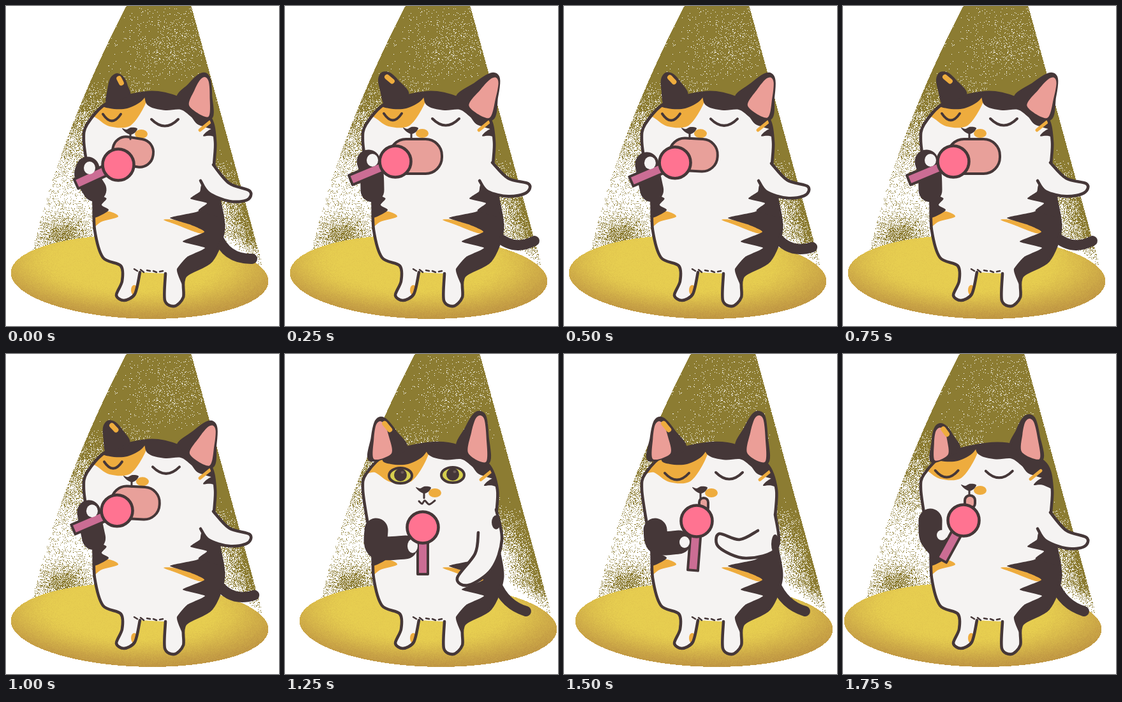
These frames come from a looping animation (428x500 px, 2000 ms). An HTML page with a canvas:

```html
<!DOCTYPE html>
<html lang="en">
<head>
<meta charset="utf-8">
<title>Singing cat</title>
<style>
html, body { margin: 0; width: 100%; height: 100%; overflow: hidden; background: #fff; }
canvas { display: block; width: 428px; height: 500px; }
</style>
</head>
<body>
<canvas id="stage" width="428" height="500"></canvas>
<script>
const ctx = document.getElementById('stage').getContext('2d');
const INK = '#453738', FUR = '#f5f3f2', ORANGE = '#eeac3e', EAR = '#eb9e97';
const MOUTH = '#e8a09a', BALL = '#ff7391', GRIP = '#cb6d94', EYE = '#d6cf4e';

const clamp = v => Math.max(0, Math.min(1, v));
const lerp = (a, b, t) => a + (b - a) * t;
const between = (a, b, t) => [lerp(a[0], b[0], t), lerp(a[1], b[1], t)];
const step = (a, b, v) => { v = clamp((v - a) / (b - a)); return v * v * (3 - 2 * v); };
const shift = (p, dx, dy) => p.map((v, i) => v + (i % 2 ? dy : dx));

// Blend two poses, number by number
function mix(a, b, t) {
  if (typeof a === 'number') return lerp(a, b, t);
  if (Array.isArray(a)) return a.map((v, i) => mix(v, b[i], t));
  return Object.fromEntries(Object.keys(a).map(k => [k, mix(a[k], b[k], t)]));
}

// Smooth path through a flat list of points
function curve(p, open, k = 0.9) {
  const n = p.length / 2, path = new Path2D();
  const at = i => {
    i = open ? Math.max(0, Math.min(n - 1, i)) : (i + n) % n;
    return [p[2 * i], p[2 * i + 1]];
  };
  path.moveTo(p[0], p[1]);
  for (let i = 0; i < (open ? n - 1 : n); i++) {
    const a = at(i - 1), b = at(i), c = at(i + 1), d = at(i + 2), t = k / 6;
    path.bezierCurveTo(b[0] + (c[0] - a[0]) * t, b[1] + (c[1] - a[1]) * t,
      c[0] - (d[0] - b[0]) * t, c[1] - (d[1] - b[1]) * t, c[0], c[1]);
  }
  if (!open) path.closePath();
  return path;
}

function ink(path, w = 4.6, color = INK) {
  ctx.strokeStyle = color;
  ctx.lineWidth = w;
  ctx.stroke(path);
}
function fill(path, color) {
  ctx.fillStyle = color;
  ctx.fill(path);
}
const blob = (color, p, k) => fill(curve(p, false, k), color);
const line = (p, w, color) => ink(curve(p, true), w, color);
function oval(color, x, y, rx, ry, w) {
  const path = new Path2D();
  path.ellipse(x, y, rx, ry, 0, 0, 7);
  fill(path, color);
  if (w) ink(path, w);
}
function box(color, x, y, angle, left, top, w, h, r) {
  const path = new Path2D();
  path.roundRect(left, top, w, h, r);
  ctx.save();
  ctx.translate(x, y);
  ctx.rotate(angle);
  fill(path, color);
  ink(path, 4);
  ctx.restore();
}

// Spotlight and floor, painted once with seeded grain
const PAD = 20;
function density(x, y, u) {
  const glow = (cx, cy, sx, sy) => Math.exp(-(((x - cx) / sx) ** 2) - ((y - cy) / sy) ** 2);
  let d = 1 - 0.09 * glow(258, 60, 60, 45);
  if (u < 0.5) d += 0.65 * glow(92, 360, 32, 24) - 0.9 * step(95, 290, y);
  else d -= step(220, 330, y) * clamp((1 - u) * 6) + 0.8 * step(350, 405, y);
  return d;
}
function makeLight() {
  const w = 470, h = 500, cv = document.createElement('canvas');
  cv.width = w;
  cv.height = h;
  const g = cv.getContext('2d'), img = g.createImageData(w, h);
  let seed = 7;
  const rnd = () => {
    seed = (Math.imul(seed, 1664525) + 1013904223) >>> 0;
    return seed / 4294967296;
  };
  const cs = Math.cos(0.036), sn = Math.sin(0.036);
  for (let y = 0; y < h; y++) for (let px = 0; px < w; px++) {
    const x = px - PAD, r = rnd(), dx = x - 209, dy = y - 423;
    const ex = (dx * cs + dy * sn) / 202, ey = (dy * cs - dx * sn) / 65;
    let c = null;
    if (ex * ex + ey * ey < 1) {
      const e = Math.hypot(ex * 0.85 + 0.05, (ey + 0.35) * 0.78);
      const m = clamp(step(0.45, 1.15, e) + (r - 0.5) * 0.22);
      c = [231 - 41 * m, 206 - 58 * m, 80 - 14 * m];
    } else if (y < 405) {
      const l = 188 - 0.52 * y + 0.00035 * y * y, u = (x - l) / (290 + 0.276 * y - l);
      if (u > 0 && u < 1 && r < density(x, y, u)) c = [140, 124, 50];
    }
    if (c) img.data.set([...c, 255], (y * w + px) * 4);
  }
  g.putImageData(img, 0, 0);
  return cv;
}
const light = makeLight();

// Body: legs and flanks are fixed, the head swells with the pose
const RIGHT = [250,418, 249,460, 264,469, 278,455, 281,422, 322,398, 341,350, 334,300];
const LEFT = [137,300, 139,350, 152,393, 180,406, 182,430, 173,452, 185,460, 202,450, 210,416];
const bodyLine = (wide, drop) => [...RIGHT,
  326 + wide, 258, 328 + wide, 212, 318, 172, 271, 144, 224, 135 + drop,
  160, 151 + drop, 127, 185 + drop / 2, 122, 212, 130, 266, ...LEFT];

const SHOULDER = [350,265, 308,278, 304,290, 289,301, 315,308, 302,320, 350,330];
const FLANK = [350,306, 318,312, 298,322, 257,331, 290,342, 311,353, 277,368, 312,378, 284,392,
  268,411, 272,426, 279,440, 290,440, 350,390];
const WAIST = [130,295, 157,300, 150,311, 161,319, 142,330, 130,330];
const BELTS = [[247,334, 268,335, 313,350, 303,355, 268,342], [134,328, 160,321, 176,329, 150,337, 136,346]];
const PATCH = [122,174, 160,140, 224,120, 219,152, 195,187, 162,188, 138,173];
const BROW = [150,152, 175,120, 224,120, 215,146, 190,160, 163,160];
const CAP = [222,110, 218,146, 227,158, 250,163, 274,162, 290,173, 305,187, 350,190, 350,110];
const CHEEK = [309,203, 320,193, 345,185, 345,210, 322,203];

// Arm held out to the side, the hand raised by lift
const reach = lift => [305,273, 318,292, 350,305, 378,303, 382,289, 350,277, 325,248]
  .map((v, i, p) => i % 2 ? v - lift * clamp((p[i - 1] - 305) / 65) : v);

// ears: left base, tip, right base; tail: bend, tip; mic: ball, grip end
const low = {
  light: 0, turn: 0, wide: 0, drop: 0, mark: [0, 0], nose: [194, 194],
  ears: [[[160,153], [174,107], [192,142]], [[270,146], [312,106], [320,175]]],
  tail: [345,396, 386,395], arm: reach(0), spot: [0, 0, 0, 0],
  mouth: [199, 228, 32, 22, 0.15], mic: [176,248, 110,278],
  sleeve: [139,287, 126,265, 128,254], hand: [131, 253, 9, 10]
};
const high = {
  ...low, nose: [197, 193],
  ears: [[[160,155], [153,105], [192,138]], [[270,145], [331,107], [323,177]]],
  tail: [358,384, 391,367], arm: reach(11),
  mouth: [205, 235, 41, 27, 0], mic: [173,243, 103,272],
  sleeve: [137,288, 136,262, 131,243], hand: [137, 241, 9, 10]
};
const front = {
  light: 15, turn: 1, wide: 5, drop: 5, mark: [3, 12], nose: [217, 211],
  ears: [[[134,166], [149,100], [189,148]], [[271,147], [306,91], [318,170]]],
  tail: [345,392, 378,402], spot: [331, 263, 7, 11],
  arm: [303,279, 298,312, 270,350, 288,361, 324,336, 340,290, 331,243],
  mouth: [0, 0, 0, 0, 0], mic: [216,271, 216,344],
  sleeve: [143,275, 146,302, 189,302], hand: [200, 300, 8, 11]
};
const croon = {
  ...front, light: 10, nose: [213, 211], spot: [331, 297, 6, 15],
  arm: [304,276, 275,290, 243,281, 243,302, 285,319, 334,303, 331,250],
  mouth: [219, 236, 7, 11, 0], mic: [208,261, 202,338],
  sleeve: [143,275, 148,295, 180,294], hand: [189, 294, 8, 9]
};
const side = {
  ...low, light: -6, turn: 0.8, drop: 6, mark: [-10, 7], nose: [197, 207],
  ears: [[[140,168], [152,110], [181,150]], [[264,147], [292,96], [311,165]]],
  tail: [345,392, 378,402], arm: reach(2),
  mouth: [199, 231, 8, 10, 0], mic: [189,260, 155,322],
  sleeve: [137,260, 138,285, 150,301], hand: [155, 283, 8, 8]
};
const waver = mix(high, low, 0.35);

function earLine(l, tip, r, w) {
  const mid = between(l, r, 0.5), len = Math.hypot(tip[0] - mid[0], tip[1] - mid[1]);
  const ax = (tip[0] - mid[0]) / len, ay = (tip[1] - mid[1]) / len;
  const beside = s => [tip[0] - ay * s - ax * 6, tip[1] + ax * s - ay * 6];
  const a = beside(-w), b = beside(w), p = between(l, a, 0.6), q = between(r, b, 0.6);
  return [...l, p[0] + ay * 2, p[1] - ax * 2, ...a, ...tip, ...b, q[0] - ay * 2, q[1] + ax * 2, ...r];
}
function drawEars({ ears: [a, b], turn }) {
  for (const e of [a, b]) {
    const path = curve(earLine(...e, 9));
    fill(path, INK);
    ink(path, 4);
  }
  const inner = (l, tip, r) => blob(EAR, earLine(l, [tip[0], tip[1] + 5], r, 7));
  inner(between(b[0], b[2], 0.35), b[1], between(b[2], b[0], 0.06));
  if (turn > 0.5) inner(between(a[0], a[2], 0.1), a[1], between(a[2], a[0], 0.4));
  line([...between(a[1], a[2], 0.18), ...between(a[1], a[2], 0.38)], 8, ORANGE);
}

function drawBody(p) {
  const tail = new Path2D();
  tail.moveTo(331, 358);
  tail.quadraticCurveTo(...p.tail);
  ink(tail, 16);
  const body = curve(bodyLine(p.wide, p.drop), true), [dx, dy] = p.mark;
  fill(body, FUR);
  ctx.save();
  ctx.clip(body);
  BELTS.forEach(s => blob(ORANGE, s));
  blob(INK, WAIST);
  blob(INK, FLANK, 0.5);
  if (p.turn < 1) blob(INK, SHOULDER, 0.5);
  oval(ORANGE, 201, 444, 5, 8);
  blob(ORANGE, shift(PATCH, dx, dy));
  blob(INK, shift(BROW, dx, dy));
  [CAP, CHEEK].forEach(s => blob(INK, shift(s, dx, dy * 0.2)));
  line(shift([304,194, 320,181], dx, dy * 0.2), 5, ORANGE);
  ctx.restore();
  ink(body);
  for (let i = 0; i < 5; i++) {
    const x = 201 + i * 10;
    line([x, 411 + i, x + 5, 414 + i % 2 * 2], 2.5);
  }
  drawEars(p);
}

function lid(x, y, w) {
  const path = new Path2D();
  path.moveTo(x - w, y - 4);
  path.quadraticCurveTo(x, y + 17, x + w, y - 4);
  ink(path, 4);
}
function openEye(x, y) {
  oval(EYE, x, y, 18, 12, 4);
  oval(INK, x, y - 1, 10, 10);
  oval('#6b5a58', x + 3, y - 5, 2.5, 2);
}
function drawFace({ nose: [x, y], turn, mouth: [mx, my, rx, ry, tilt] }) {
  const leftX = x - 28 - 8 * turn, rightX = x + 55 - 9 * turn, rightY = y - 13 - 9 * turn;
  oval(ORANGE, x + 18, y + 6, 10, 7);
  if (rx) {
    lid(leftX, y - 21, lerp(14, 19, turn));
    lid(rightX, rightY, 21);
    box(MOUTH, mx, my, tilt, -rx, -ry, rx * 2, ry * 2, Math.min(rx, ry) * 0.95);
  } else {
    openEye(leftX, y - 21);
    openEye(rightX, rightY);
    line(shift([-7,19, -2,23, 2,18, 9,24, 18,18], x, y), 3);
  }
  line([x + 1, y + 3, x + 1, y + 14], 3);
  blob(INK, shift([-12,-3, -5,-1, 1,-4, 8,-4, 12,-2, 8,4, 1,7, -7,3], x, y));
}

function drawMic([x, y, ex, ey], hand) {
  const len = Math.hypot(ex - x, ey - y);
  box(GRIP, x, y, Math.atan2(ey - y, ex - x), 15, -8, len - 15, 16, 0);
  oval(FUR, ...hand);
  oval(BALL, x, y, 24.5, 24.5, 4.6);
}

function draw(p) {
  ctx.fillStyle = '#fff';
  ctx.fillRect(0, 0, 428, 500);
  ctx.drawImage(light, p.light - PAD, 0);
  ctx.lineCap = ctx.lineJoin = 'round';
  drawBody(p);
  const arm = curve(p.arm, true, 1);
  fill(arm, FUR);
  ink(arm);
  oval(INK, ...p.spot);
  drawFace(p);
  line(p.sleeve, 37);
  drawMic(p.mic, p.hand);
}

const POSES = [low, high, waver, high, waver, front, croon, side];
function tick() {
  draw(POSES[Math.floor(performance.now() / 250) % POSES.length]);
  requestAnimationFrame(tick);
}
tick();
</script>
</body>
</html>
```
